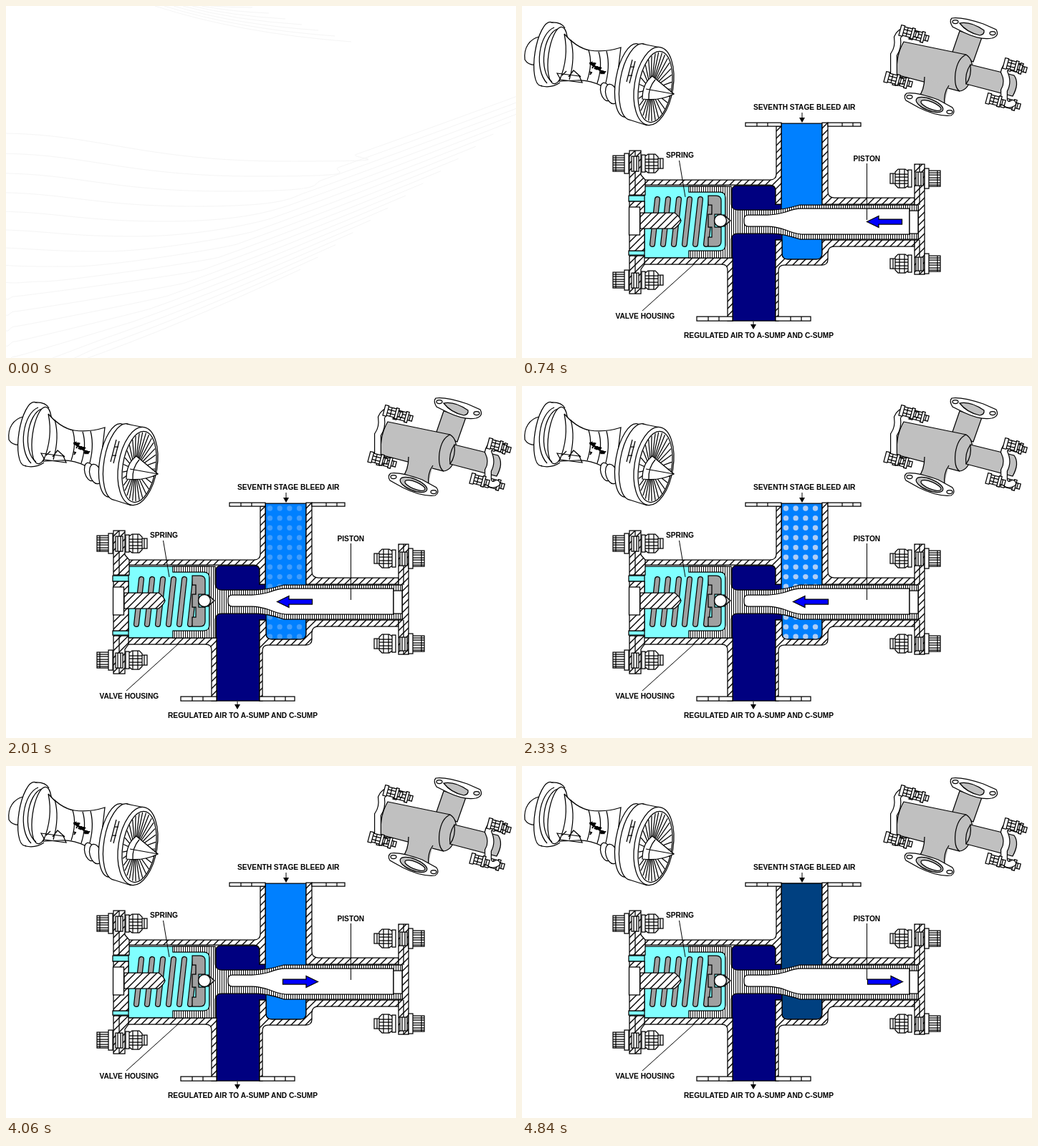
Recreate the animation shown at these times as an HTML page. Size 712 by 492 pixels, loop 8000 ms.

```html
<!DOCTYPE html>
<html lang="en">
<head>
<meta charset="utf-8">
<title>Bleed air valve</title>
<style>
  html, body { margin: 0; width: 100%; height: 100%; overflow: hidden; background: #fff; }
  svg { display: block; width: 712px; height: 492px; }
  #diagram { stroke-width: 1.25; }
  .ink { fill: #fff; stroke: #000; }
  .line { fill: none; stroke: #000; }
  .hatch { fill: url(#diagonal); stroke: #000; }
  .ribs { fill: url(#vertical); stroke: #000; }
  .metal { fill: #c0c0c0; stroke: #000; }
  .cyan { fill: #80ffff; stroke: #000; }
  .navy { fill: #000080; stroke: #000; }
  .arrow { fill: #00f; stroke: #000; }
  text { font: bold 10.18px "Liberation Sans", Arial, sans-serif; }
</style>
</head>
<body>
<svg viewBox="0 0 712 492">
  <defs>
    <pattern id="diagonal" width="10" height="10" patternUnits="userSpaceOnUse">
      <rect width="10" height="10" fill="#fff"/>
      <path d="M-1 11L11 -1M-1 1L1 -1M9 11L11 9" stroke="#000" stroke-width="1.4"/>
    </pattern>
    <pattern id="vertical" width="3" height="6" patternUnits="userSpaceOnUse">
      <rect width="3" height="6" fill="#fff"/>
      <path d="M1.5 0V6" stroke="#111" stroke-width="1.1"/>
    </pattern>
    <path id="duct" d="M362 164H419V284H362ZM363 318H419V346Q419 354 411 354H371Q363 354 363 346Z"/>
    <clipPath id="ductClip"><use href="#duct"/></clipPath>
    <g id="bolt">
      <path class="ink" d="M127 209H143V231H127ZM143 206H149V234H143ZM167 208H172V232H167ZM172 210L176 207H186L190 211V229L186 233H176L172 230ZM190 213H197V227H190Z"/>
      <path class="line" d="M127 212H143M127 215H143M127 219H143M127 222H143M127 226H143M127 229H143M131 209V231M172 214H190M172 218H190M172 223H190M172 227H190M177 207V233M184 207V233M193 213V227"/>
    </g>
  </defs>

  <g id="backdrop" fill="none" stroke="#f5f5f5"></g>

  <g id="diagram">
    <!-- engine -->
    <g class="ink">
      <path d="M24 43C11 46 2 58 4 75C8 82 15 83 22 82Z"/>
      <ellipse cx="33" cy="67" rx="15" ry="45" transform="rotate(9 33 67)"/>
      <path d="M40 23L60 29L52 110L28 112Z" stroke="none"/>
      <path class="line" d="M40 23Q55 22 60 31M27 112Q42 115 53 107"/>
      <ellipse cx="50" cy="69" rx="13" ry="40" transform="rotate(8 50 69)"/>
      <path class="line" d="M50 32C30 38 22 92 42 106M45 30C24 38 16 88 35 108"/>
      <path d="M59 39C68 50 82 60 95 62Q116 65 138 58L130 126L112 112Q94 103 76 104L52 105Q66 72 59 39Z"/>
      <path class="line" d="M68 47Q75 72 66 103M93 62Q99 80 91 104M107 64Q113 83 105 108M118 63Q124 86 115 114M49 94L80 98L84 107L54 103ZM56 97L62 91M65 99L72 90L82 99"/>
      <ellipse cx="117" cy="120" rx="7" ry="13" transform="rotate(-15 117 120)"/>
      <ellipse cx="125" cy="123" rx="8" ry="14" transform="rotate(-15 125 123)"/>
      <ellipse cx="152" cy="104" rx="21" ry="52" transform="rotate(10 152 104)"/>
      <ellipse cx="160" cy="106" rx="23" ry="54" transform="rotate(10 160 106)"/>
      <path d="M168 53L194 58L176 167L150 159Z" stroke="none"/>
      <path class="line" d="M168 53L193 58M150 159L175 167M154 75L146 106M158 77L150 108M152 85H157M149 97H154"/>
      <ellipse cx="184" cy="112" rx="27" ry="55" transform="rotate(9 184 112)"/>
      <ellipse cx="186" cy="113" rx="23" ry="50" transform="rotate(9 186 113)"/>
      <g id="blades"></g>
      <path d="M182 98L212 123Q193 133 168 130Q168 108 182 98Z"/>
      <path class="line" d="M212 123L173 116M186 103Q176 114 177 131"/>
      <path id="scribble" class="line" stroke-width="1.8"/>
    </g>

    <!-- assembled valve -->
    <g id="assembly">
      <g id="rearStuds"></g>
      <path class="metal" d="M611 35L642 44L630 78L600 67Z"/>
      <path class="ink" d="M600 17Q614 15 644 25L662 33Q667 42 656 45Q640 48 617 37L601 29Q596 21 600 17Z"/>
      <path class="metal" d="M611 24Q626 21 645 34Q646 40 639 41Q621 37 611 24Z"/>
      <ellipse class="ink" cx="605" cy="22" rx="4" ry="2.5"/><ellipse class="ink" cx="657" cy="38" rx="4" ry="2.5"/>
      <path class="metal" d="M533 50L620 68Q631 75 628 94Q625 117 611 119L523 96Q522 68 533 50Z"/>
      <path class="metal" d="M626 82L687 97Q695 108 685 126L620 109Q628 98 626 82Z"/>
      <path class="line" d="M620 68Q608 73 605 94Q603 114 611 119M626 82Q618 94 620 109"/>
      <path d="M562 100Q578 108 596 111L589 140L552 130Q560 118 562 100Z" fill="#c0c0c0"/>
      <path class="line" d="M562 99Q562 118 553 128M596 111Q588 122 590 138"/>
      <path class="ink" d="M537 122Q550 120 581 131L601 142Q606 149 599 153Q580 155 554 142L536 132Q532 126 537 122Z"/>
      <ellipse class="metal" cx="569" cy="138" rx="20" ry="8" transform="rotate(22 569 138)"/>
      <ellipse class="ink" cx="571" cy="139" rx="15" ry="5" transform="rotate(22 571 139)"/>
      <ellipse class="ink" cx="541" cy="127" rx="4" ry="2.5"/><ellipse class="ink" cx="597" cy="148" rx="4" ry="2.5"/>
      <g id="straps" fill="none" stroke-linecap="round"></g>
      <g id="frontStuds"></g>
    </g>

    <!-- fluids -->
    <g id="fluids">
      <path class="navy" d="M293 258Q293 251 300 251H346Q354 251 354 258V277H364V327H354V440H294Z"/>
      <use href="#duct" fill="#0080ff" stroke="#000"/>
      <use href="#duct" id="shade" fill="#004080" stroke="#000"/>
      <g clip-path="url(#ductClip)" fill="#afcdf5"><g id="dotsA"></g><g id="dotsB"></g></g>
      <path class="cyan" d="M171 252H284V352H171ZM149 265H171V273H149ZM149 342H171V348H149Z"/>
    </g>

    <!-- housing -->
    <g class="hatch">
      <path d="M165 243H346Q355 243 355 235V168H362V277H354V258Q354 250 346 250H171V252H165Z"/>
      <path d="M165 352H294V440H287V369Q287 361 279 361H165Z"/>
      <path d="M419 163V277H548V268H436Q427 268 427 259V163Z"/>
      <path d="M354 327H363V346Q363 354 371 354H411Q419 354 419 346V327H548V336H436Q427 336 427 345V354Q427 362 419 362H366Q358 362 358 370V440H354Z"/>
      <path d="M150 202H166V236L172 243V264H150ZM150 273H171V342H150ZM150 349H171V361L166 368V402H150Z"/>
      <path d="M548 221H562V375H548V327H553V278H548Z"/>
    </g>
    <path class="ink" d="M312 163H362V168H312ZM427 163H473V168H427ZM244 434H294V440H244ZM354 434H403V440H354Z"/>
    <path class="line" d="M158 202V264M158 349V402M555 221V278M555 327V375M328 163V168M343 163V168M447 163V168M462 163V168M260 434V440M275 434V440M375 434V440M390 434V440"/>
    <path class="ink" d="M153 210H163V231H153ZM153 373H163V394H153ZM550 232H560V251H550ZM550 351H560V370H550Z"/>
    <path class="line" d="M156 210V231M160 210V231M156 373V394M160 373V394M553 232V251M557 232V251M553 351V370M557 351V370"/>
    <rect class="ink" x="149.5" y="281" width="15" height="39"/>
    <use href="#bolt"/>
    <use href="#bolt" y="163"/>
    <use href="#bolt" transform="translate(711 21) scale(-1 1)"/>
    <use href="#bolt" transform="translate(711 140) scale(-1 1)"/>

    <!-- spring and piston -->
    <g id="spring" fill="none" stroke-linecap="round"></g>
    <path class="hatch" d="M165 289H213Q220 294 222 300Q220 306 213 311H165Z"/>
    <path d="M260 265H271Q278 265 278 272V291H269V309H278V329Q278 336 271 336H260V323H265V309H260V291H265V278H260Z" fill="#a0a0a0" stroke="#000"/>
    <path class="ribs" d="M233 252H292V277Q293 285 301 285H350Q364 285 388 278H553V326H388Q364 318 350 318H301Q293 318 292 326V352H233V342H276Q284 342 284 334V268Q284 260 276 260H233Z"/>
    <path class="ink" d="M316 292H343Q354 292 368 288Q380 283 390 283H541V319H390Q380 318 368 313Q354 308 343 308H316Q310 308 310 302V298Q310 292 316 292Z"/>
    <path class="ink" d="M541 286H553V318H541Z"/>
    <path class="metal" d="M282 292L291 300L282 308Z"/>
    <circle class="ink" cx="277" cy="300" r="8.5" stroke-width="1.4"/>

    <!-- labels -->
    <path class="line" stroke-width="1" d="M219.500 216L228 267M481.500 220V299M168 426L240 361M391 149V158M323 441V447"/>
    <path d="M387 156H395L391 163ZM319 445H327L323 452Z"/>
    <text x="323" y="145">SEVENTH STAGE BLEED AIR</text>
    <text x="201" y="212">SPRING</text>
    <text x="462.500" y="217">PISTON</text>
    <text x="130.500" y="437">VALVE HOUSING</text>
    <text x="226" y="464">REGULATED AIR TO A-SUMP AND C-SUMP</text>
    <path id="leftArrow" class="arrow" d="M0.500 301.500L17 293.500V298H49.500V305H17V309.500Z"/>
    <path id="rightArrow" class="arrow" d="M49.500 301.500L33 293.500V298H0.500V305H33V309.500Z"/>
  </g>
</svg>

<script>
const $ = id => document.getElementById(id);

function add(parent, tag, attrs) {
  const node = document.createElementNS("http://www.w3.org/2000/svg", tag);
  for (const key in attrs) node.setAttribute(key, attrs[key]);
  $(parent).append(node);
  return node;
}

const repeat = (count, draw) => { for (let i = 0; i < count; i++) draw(i); };

// Outlined tube: a wide black stroke under a narrower coloured one
function tube(parent, d, width, color) {
  add(parent, "path", { d, stroke: "#000", "stroke-width": width });
  add(parent, "path", { d, stroke: color, "stroke-width": width - 2.4 });
}

function stud(parent, x, y) {
  const transform = `translate(${x} ${y}) rotate(15) scale(1.25)`;
  add(parent, "path", { class: "ink", transform, "stroke-width": 1,
    d: "M-10 -6H-6V6H-10ZM-6 -5H3V5H-6ZM3 -6H6V6H3ZM6 -3H11V3H6Z" });
  add(parent, "path", { class: "line", transform, "stroke-width": 1,
    d: "M-6 -2H3M-6 2H3M-2 -5V5M8 -3V3" });
}

// Backdrop curves
repeat(17, i => {
  const y = 178 + 28.6 * i - 0.32 * i * i;
  const tx = Math.max(12, 390 - 42 * i), ty = 217 + 21 * i;
  const jx = 490 - 24 * i, jy = 207 + 18 * i;
  const ex = 803 - 24.5 * i, ey = 93 + 17.2 * i;
  add("backdrop", "path", { d: `M0 ${y}C${tx / 3} ${y + 2} ${tx / 2} ${ty} ${tx} ${ty}` +
    `S${jx - 20} ${jy + 6} ${jx} ${jy}Q${jx + 130} ${jy - 46} ${ex} ${ey}` });
});
repeat(7, i => add("backdrop", "path", {
  d: `M${208 + 13 * i} 0Q${325 - 2 * i} ${38 - 6 * i} ${482 - 23 * i} ${50 - 8 * i}` }));

// Engine fan: each blade is a narrow leaf from hub to rim
repeat(15, i => {
  const a = i / 15 * 2 * Math.PI;
  const rim = turn => `${186 + 22 * Math.cos(a + turn) - 7 * Math.sin(a + turn)} ` +
    `${113 + 48 * Math.sin(a + turn) + 3 * Math.cos(a + turn)}`;
  add("blades", "path", { class: "line", d: `M${rim(0)}L180 117L${rim(0.22)}` });
});
let marks = "";
repeat(20, i => marks += `M${94 + i * 7 % 18} ${80 + i * 5 % 13}l${3 + i % 3} ${i % 4 - 1}l-2 3`);
$("scribble").setAttribute("d", marks);

// Assembled valve hardware
stud("rearStuds", 554, 42);
stud("rearStuds", 691, 86);
stud("rearStuds", 531, 106);
stud("rearStuds", 682, 137);
tube("straps", "M543 36Q529 32 524 44Q526 58 519 68V98Q521 108 528 104", 10, "#fff");
tube("straps", "M690 83Q676 78 673 92Q680 106 673 118V132Q677 141 685 136", 10, "#fff");
stud("frontStuds", 540, 37);
stud("frontStuds", 519, 102);
stud("frontStuds", 685, 83);
stud("frontStuds", 661, 132);

// Spring coils
repeat(6, i => {
  const x = 183 + 15 * i;
  tube("spring", `M${x + 6} 270L${x - 1} 333`, 8, "#a0a0a0");
});

// Flow dots, above and below the piston
function dots(group, x0, y0, rows) {
  repeat(rows * 4, i => add(group, "circle", {
    cx: x0 + i % 4 * 13.67, cy: y0 + Math.floor(i / 4) * 13.66, r: 3.7 }));
}
dots("dotsA", 368.5, 171, 9);
dots("dotsA", 368.5, 323, 3);
dots("dotsB", 374.5, 178, 8);
dots("dotsB", 374.5, 330, 2);

// Progress from 0 to 1 in even jumps
function stepped(t, start, end, jumps) {
  const k = Math.floor((t - start) / (end - start) * jumps + 0.25);
  return Math.max(0, Math.min(1, k / jumps));
}
const fade = (t, start, end, steps) =>
  t < start || t >= 3730 ? 0 : (1 + stepped(t, start, end, steps - 1) * (steps - 1)) / steps;
const show = (id, on) => $(id).setAttribute("visibility", on ? "visible" : "hidden");
const moveX = (id, x) => $(id).setAttribute("transform", `translate(${x} 0)`);

function render() {
  const t = performance.now() % 8000;
  const started = t >= 130;
  $("backdrop").style.display = started ? "none" : "";
  $("diagram").style.display = started ? "" : "none";

  show("leftArrow", t >= 740 && t < 3730);
  moveX("leftArrow", 481 - 103 * stepped(t, 740, 1470, 11));
  $("dotsA").setAttribute("opacity", fade(t, 1870, 2330, 8));
  $("dotsB").setAttribute("opacity", fade(t, 2740, 3150, 7));

  const back = stepped(t, 4060, 4840, 12);
  show("rightArrow", t >= 4060);
  moveX("rightArrow", 386 + 96 * back);
  $("shade").setAttribute("opacity", back);
  requestAnimationFrame(render);
}
render();
</script>
</body>
</html>
```
